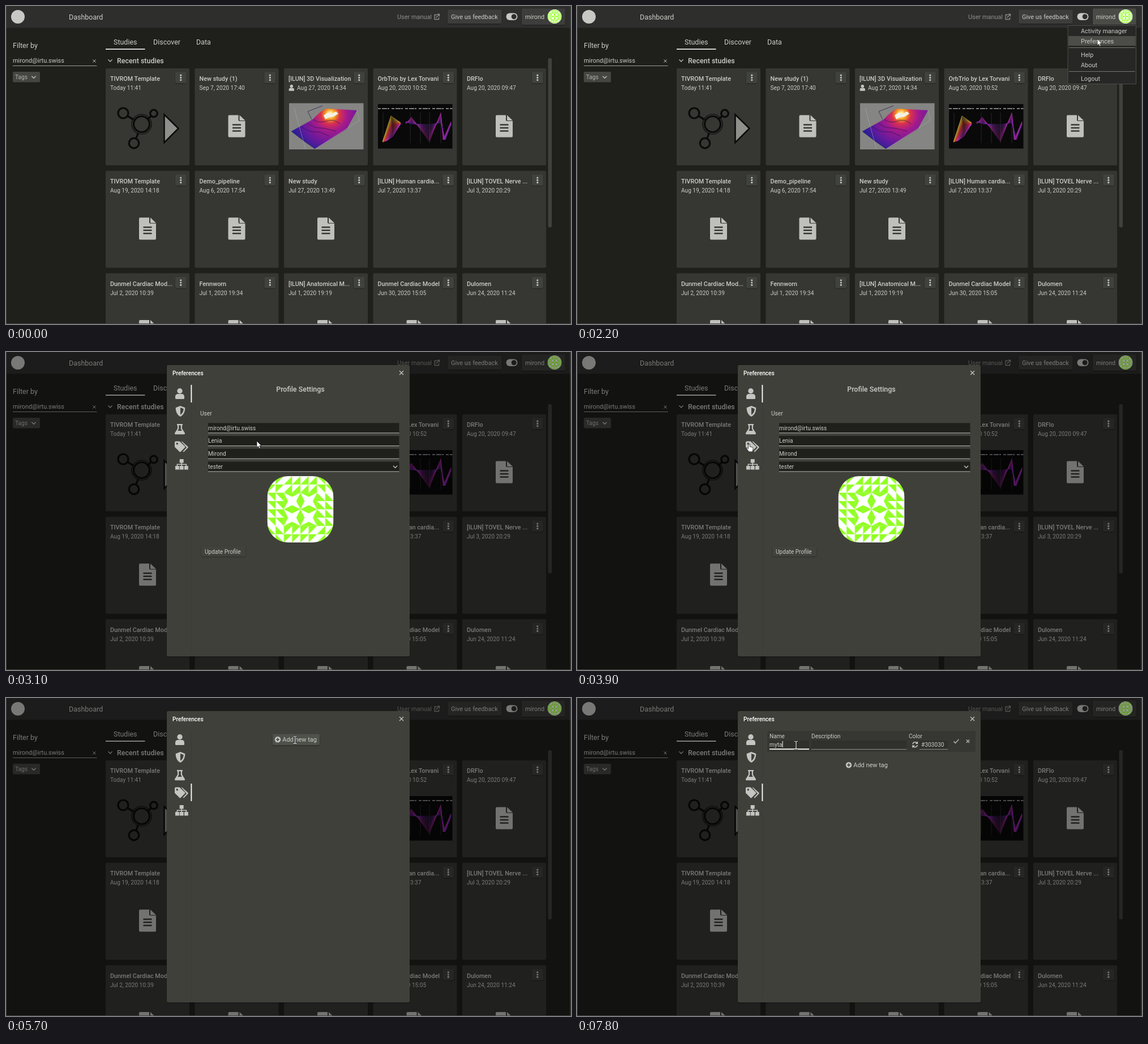
Write an HTML page that moves like this. It is 998 px wide and 561 px high and loops after 8000 ms.

```html
<!DOCTYPE html>
<html lang="en">
<head>
<meta charset="utf-8">
<title>Dashboard preferences</title>
<style>
html, body { margin: 0; width: 100%; height: 100%; overflow: hidden; background: #1f201c; }
svg { display: block; width: 100vw; height: 100vh; }
text { font: 10.92px Roboto, Arial, sans-serif; fill: #cbccc7; white-space: pre; }
.s { font-size: 10.14px; }
.l { font-size: 12.48px; }
.b { font-weight: 500; }
.t { font-size: 10.8px; font-weight: 500; }
.w { fill: #fff; }
.dim { fill: #8f908b; }
.mid { text-anchor: middle; }
.ic { fill: #c4c5c0; }
.ln { fill: none; stroke: #c4c5c0; stroke-width: 1.3; }
.hole { fill: #3f403b; }

.a { opacity: 0; animation: 8s step-end infinite; }
.m { animation: 8s step-end infinite; }
#hover { animation-name: hover; }
#menu { animation-name: menu; }
#item1 { animation-name: item1; }
#item2 { animation-name: item2; }
#modal { animation-name: modal; }
#profile { animation-name: profile; }
#before { animation-name: before; }
#after { animation-name: after; }
#tags { animation-name: tags; }
#bar { animation-name: bar; }
#addbg { animation-name: addbg; }
#add { animation-name: add; }
#form { animation-name: form; }
#focus { animation-name: focus; }
#caret { animation-name: caret; }
#typed1 { animation-name: typed1; }
#typed2 { animation-name: typed2; }
#typed4 { animation-name: typed4; }
#cursor { animation-name: travel; }
#arrow { animation-name: arrow; }
#hand { animation-name: hand; }
#beam { animation-name: beam; }

@keyframes hover { 10% { opacity: 1 } 32.5% { opacity: 0 } }
@keyframes menu { 15% { opacity: 1 } 32.5% { opacity: 0 } }
@keyframes item1 { 25% { opacity: 1 } 27.5% { opacity: 0 } }
@keyframes item2 { 27.5% { opacity: 1 } 32.5% { opacity: 0 } }
@keyframes modal { 32.5% { opacity: 1 } }
@keyframes profile { 32.5% { opacity: 1 } 53.75% { opacity: 0 } }
@keyframes before { 32.5% { opacity: 1 } 36.25% { opacity: 0 } }
@keyframes after { 36.25% { opacity: 1 } }
@keyframes tags { 53.75% { opacity: 1 } }
@keyframes bar { 53.75% { transform: translateY(93px) } }
@keyframes addbg { 70% { opacity: 1 } 73.75% { opacity: 0 } }
@keyframes add { 73.75% { transform: translateY(45px) } }
@keyframes form { 73.75% { opacity: 1 } }
@keyframes focus { 87.5% { opacity: 1 } }
@keyframes caret {
  88.75% { opacity: 1; transform: none }
  93.75% { opacity: 1; transform: translateX(8.9px) }
  95% { opacity: 1; transform: translateX(13.7px) }
  97.5% { opacity: 1; transform: translateX(22.6px) }
}
@keyframes typed1 { 93.75% { opacity: 1 } 95% { opacity: 0 } }
@keyframes typed2 { 95% { opacity: 1 } 97.5% { opacity: 0 } }
@keyframes typed4 { 97.5% { opacity: 1 } }
@keyframes arrow { 10% { opacity: 1 } 48.75% { opacity: 0 } 62.5% { opacity: 1 } 63.75% { opacity: 0 } }
@keyframes hand { 48.75% { opacity: 1 } 62.5% { opacity: 0 } }
@keyframes beam { 63.75% { opacity: 1 } }
@keyframes travel {
  10% { transform: translate(966px, 24px) }
  11.25% { transform: translate(957px, 19px) }
  12.5% { transform: translate(952px, 16px) }
  13.75% { transform: translate(949px, 14px) }
  22.5% { transform: translate(947px, 15px) }
  23.75% { transform: translate(942px, 24px) }
  25% { transform: translate(933px, 38px) }
  26.25% { transform: translate(924px, 50px) }
  27.5% { transform: translate(919px, 58px) }
  36.25% { transform: translate(840px, 84px) }
  37.5% { transform: translate(640px, 125px) }
  38.75% { transform: translate(443px, 157px) }
  41.25% { transform: translate(347px, 157px) }
  43.75% { transform: translate(330px, 161px) }
  45% { transform: translate(300px, 168px) }
  46.25% { transform: translate(269px, 172px) }
  47.5% { transform: translate(288px, 167px) }
  48.75% { transform: translate(304px, 162px) }
  62.5% { transform: translate(318px, 157px) }
  63.75% { transform: translate(368px, 136px) }
  65% { transform: translate(432px, 112px) }
  66.25% { transform: translate(486px, 92px) }
  67.5% { transform: translate(510.5px, 85px) }
  70% { transform: translate(510.5px, 78px) }
  71.25% { transform: translate(510.5px, 74px) }
  73.75% { transform: translate(500px, 75px) }
  75% { transform: translate(480px, 77px) }
  76.25% { transform: translate(450px, 79px) }
  77.5% { transform: translate(420px, 81px) }
  78.75% { transform: translate(398px, 83px) }
  80% { transform: translate(387px, 83px) }
}
</style>
</head>
<body>
<svg viewBox="0 0 998 561">
  <defs>
    <g id="ident"></g>
    <clipPath id="round"><circle cx="2" cy="2" r="2"/></clipPath>
    <clipPath id="soft"><rect width="4" height="4" rx="1.25"/></clipPath>
    <path id="cross" d="M-3.5-3.5l7 7m0-7l-7 7"/>
    <path id="down" d="M-3.6-1.8l3.6 3.6 3.6-3.6"/>
    <g id="person"><circle cy="-4.7" r="4.7"/><path d="M-8 8v-2.500q0-5 5-5h6q5 0 5 5v2.500q0 1.500-1.500 1.500h-13q-1.500 0-1.500-1.500z"/></g>
    <g id="doc">
      <path d="M-13-19.500h16v8.500q0 2 2 2h10v26.500q0 2-2 2h-26q-2 0-2-2v-35q0-2 2-2z" fill="#bfc0bb"/>
      <path d="M5-19.500l10 9.500h-9q-1 0-1-1z" fill="#bfc0bb"/>
      <path d="M-7.500-2.500h15m-15 5.500h15m-15 5.500h15" stroke="#363733" stroke-width="2.500"/>
    </g>
    <radialGradient id="heat" gradientUnits="userSpaceOnUse" cx="573" cy="191" r="70">
      <stop offset=".04" stop-color="#fff3a0"/><stop offset=".13" stop-color="#f59a20"/>
      <stop offset=".24" stop-color="#d8304f"/><stop offset=".42" stop-color="#a31a8c"/>
      <stop offset=".75" stop-color="#651a9d"/><stop offset="1" stop-color="#2b1f97"/>
    </radialGradient>
    <filter id="shadow" x="-10%" y="-20%" width="120%" height="150%"><feDropShadow dx="0" dy="1" stdDeviation="1" flood-opacity=".4"/></filter>
  </defs>

  <rect width="998" height="561" fill="#1f201c"/>

  <!-- header -->
  <rect width="998" height="38.500" fill="#2e2f2d"/>
  <circle cx="21" cy="19" r="12" fill="#c8c9c5"/>
  <text class="l" x="111" y="23.500">Dashboard</text>
  <text class="dim" x="691" y="22.500">User manual</text>
  <path class="ln" style="stroke:#8f908b" d="M761 15.500h-4v8h7.500v-3.500M759.500 20.500l5.500-5.500m-3.500-.5h4v4"/>
  <g filter="url(#shadow)" fill="#3d3e3b">
    <rect x="780" y="6.500" width="95.500" height="24.500" rx="2"/>
    <rect x="911" y="4.500" width="76.500" height="28.500" rx="2"/>
  </g>
  <text x="786" y="22.500">Give us feedback</text>
  <rect x="883.500" y="12.500" width="20" height="12.500" rx="6.250" fill="#c8c9c5"/>
  <circle cx="897.200" cy="18.750" r="4.500" fill="#2e2f2d"/>
  <rect id="hover" class="a" x="911" y="4.500" width="76.500" height="28.500" rx="2" fill="#4a4b47"/>
  <text x="917" y="22.500">mirond</text>
  <g transform="translate(956.500 6) scale(6.250)" clip-path="url(#round)"><use href="#ident"/></g>

  <!-- filters -->
  <text class="l" x="12" y="73.500">Filter by</text>
  <text x="12" y="100">mirond@irtu.swiss</text>
  <path d="M12 105.500h148.500" stroke="#9c9d98"/>
  <use href="#cross" class="ln" transform="translate(156 97) scale(.75)"/>
  <rect x="12" y="116" width="48" height="18.500" rx="2" fill="#454642"/>
  <text class="s" x="16" y="129.300" style="fill:#b1b2ad">Tags</text>
  <use href="#down" class="ln" x="49" y="125.500"/>

  <!-- tabs and list -->
  <text class="l" x="190" y="67.700">Studies</text>
  <text class="l" x="260" y="67.700">Discover</text>
  <text class="l" x="336" y="67.700">Data</text>
  <rect x="176" y="75.300" width="69.500" height="1.700" fill="#eee"/>
  <use href="#down" class="ln" x="184" y="96.200"/>
  <text class="l b" x="196" y="100.500">Recent studies</text>
  <g id="cards"></g>

  <g fill="none" stroke="#0a0a0a" stroke-width="3.200">
    <circle cx="207" cy="189" r="9"/><circle cx="261" cy="189.500" r="6.300"/><circle cx="226" cy="242" r="8.800"/>
    <circle cx="239.500" cy="208.500" r="14"/><circle cx="239.500" cy="208.500" r="17.500" stroke-width="1.200"/>
    <path d="M214.500 194l11 6.500M256.500 194l-5.500 5M229.500 234l4-10"/>
    <path d="M279.500 191.500v49.500l25-25z" fill="#8f908c" stroke-width="2.500"/>
  </g>

  <rect x="500" y="171.500" width="131.500" height="81.500" fill="#858583"/>
  <path d="M504 221L542 200Q556 184 566 181L620 184L602 217L546 252L526 238z" fill="url(#heat)"/>
  <path d="M504 221L526 238L546 252M542 200q12 8 24 3t24 5M533 207q10 8 20 8t30 6M522 213q14 10 24 9t25 8M540 200l-7-14 26-10" fill="none" stroke="#23154f" stroke-width=".7"/>
  <path d="M509 180l20 72M546 252l78-50-4-18" fill="none" stroke="#aeb0b8" stroke-width=".5"/>
  <path d="M561 193l7-5 8 2 7-4 4 4-8 5-7 1-8 4z" fill="#f4f0e6"/>

  <rect x="657" y="173" width="131.500" height="78.500" fill="#090909"/>
  <path d="M657 181h131.500" stroke="#a5a5a5" stroke-width="1.500" stroke-dasharray="5 2 9 1 3 4"/>
  <path d="M666 188v54m48-54v54m18-54v54m16-54v54m20-54v54" stroke="#444" stroke-width=".5"/>
  <g id="plot" fill="none" stroke-width=".7"></g>

  <rect x="957.500" y="92" width="6.500" height="298.500" rx="2.500" fill="#40413d"/>

  <!-- user menu -->
  <g id="menu" class="a">
    <rect x="867" y="34.500" width="120.500" height="103" fill="#272825" stroke="#4d4e4a"/>
    <rect id="item1" class="a" x="868" y="35.500" width="118.500" height="17" fill="#4c4d49"/>
    <rect id="item2" class="a" x="868" y="53" width="118.500" height="17" fill="#4c4d49"/>
    <path d="M869 73.500h116.500M869 115.500h116.500" stroke="#777873"/>
    <text x="890" y="47.500">Activity manager</text>
    <text x="890" y="65.500">Preferences</text>
    <text x="890" y="89.500">Help</text>
    <text x="890" y="107.500">About</text>
    <text x="890" y="131.500">Logout</text>
  </g>

  <g id="modal" class="a">
    <rect x="1" width="995.500" height="560" opacity=".4"/>
    <rect x="284" y="23" width="429" height="514" rx="3" fill="#3f403b" filter="url(#shadow)"/>
    <text class="s b w" x="294" y="40.500">Preferences</text>
    <use href="#cross" class="ln" x="698.500" y="36.700"/>
    <path d="M327.500 58v473" stroke="#393a35"/>
    <rect id="bar" class="m" x="326.500" y="58" width="1.800" height="31" fill="#fff"/>

    <g class="ic">
      <use href="#person" x="307" y="73.500"/>
      <path d="M308 95l8.300 3.300c0 7-2.300 12.500-8.300 15.700c-6-3.200-8.300-8.700-8.300-15.700z"/>
      <path class="hole" d="M308 98v12.800c3.800-2.400 5.500-6 5.700-10.500z"/>
      <path d="M302 127h10v2.200h-1v6l4.800 7.500q1 2-1.500 2.500h-14.600q-2.500-.5-1.500-2.500l4.800-7.500v-6h-1z"/>
      <path class="hole" d="M305.200 129.200h3.600v6.500l2 3.300h-7.600l2-3.300z"/>
      <path d="M300 157.500h6.500l9.500 9q1 1 0 2l-7.500 7.500q-1 1-2 0l-8.500-8.500v-8q0-2 2-2z"/>
      <circle class="hole" cx="302.300" cy="161.700" r="1.700"/>
      <path d="M309.500 157.800h1.500l10.300 9.200q1 1 0 2l-7.300 7.500-1.500-1 6.500-7z"/>
      <path d="M306.700 189h7v6.500h-7zM299 201h6.800v6.500h-6.800zM306.700 201h7v6.500h-7zM315 201h6.800v6.500h-6.800z"/>
      <path class="ln" style="stroke-width:1.600" d="M310.200 195v6M302.400 201v-2.700h16v2.700"/>
    </g>

    <g id="profile" class="a">
      <text class="l b mid" x="520" y="69.500">Profile Settings</text>
      <text class="s" x="343" y="112">User</text>
      <g id="fields"></g>
      <text class="s" x="357" y="205.500">tester</text>
      <use href="#down" class="ln" x="687.500" y="202.500"/>
      <g id="before" class="a">
        <text class="s" x="357" y="137.500">dotty@irtu.orve.ch</text>
        <text class="s" x="357" y="160">Dotty</text>
        <text class="s" x="357" y="182.700">Dorvane</text>
        <circle cx="520" cy="277" r="55" fill="#d0e89b"/>
        <g fill="#0b0b0b">
          <path d="M505 285Q497 300 494 328Q506 335 520 335T546 328Q543 300 535 285z"/>
          <path id="ear" d="M504 247C495 240 484 242 481 254C478 267 480 275 488 280C495 276 499 266 505 261z"/>
          <use href="#ear" transform="translate(1040) scale(-1 1)"/>
          <path d="M503 247Q520 238 537 247Q545 262 540 279Q536 300 530 306Q520 312 510 306Q504 300 500 279Q495 262 503 247z"/>
        </g>
        <g id="half">
          <path d="M485 249q8-4 15 1M484 256q4 10 4 18M508 251q6-3 9-1M512 290q-4 6-1 13M504 313q-4 7-5 15M511 318q-1 7 0 13" fill="none" stroke="#6c6c6c" stroke-width="1.200"/>
          <ellipse cx="506" cy="271" rx="4.600" ry="4" fill="#a8354a"/>
          <circle cx="506.500" cy="271" r="2"/>
        </g>
        <use href="#half" transform="translate(1040) scale(-1 1)"/>
        <path d="M513 303q7 6 14 0" fill="none" stroke="#ddd" stroke-width="1.500"/>
        <ellipse cx="520" cy="297" rx="6" ry="5" stroke="#888"/>
        <path d="M516 294q4-2 8 0" fill="none" stroke="#bbb"/>
      </g>
      <g id="after" class="a">
        <text class="s" x="357" y="137.500">mirond@irtu.swiss</text>
        <text class="s" x="357" y="160">Lenia</text>
        <text class="s" x="357" y="182.700">Mirond</text>
        <g transform="translate(461.500 219) scale(29.250)" clip-path="url(#soft)"><use href="#ident"/></g>
      </g>
      <rect x="345" y="343" width="78" height="17.500" rx="2" fill="#42433e" filter="url(#shadow)"/>
      <text class="s" x="351" y="355.500">Update Profile</text>
    </g>

    <g id="tags" class="a">
      <rect id="addbg" class="a" x="471" y="63.500" width="83" height="19.500" rx="2" fill="#50514c" filter="url(#shadow)"/>
      <g id="add" class="m">
        <circle class="ic" cx="480" cy="73.200" r="5.200"/>
        <path d="M477 73.200h6m-3-3v6" stroke="#3f403b" stroke-width="1.600"/>
        <text x="488.300" y="77">Add new tag</text>
      </g>
      <g id="form" class="a">
        <rect x="336" y="58" width="368" height="37" rx="2" fill="#363732"/>
        <path d="M340 75h70v15.500h-70zM414 75h168v15.500h-168zM605 75h50v15.500h-50z" fill="#30312d"/>
        <path d="M340 90.500h70m4 0h168m23 0h50" stroke="#8d8e89"/>
        <rect id="focus" class="a" x="340" y="89.300" width="70" height="1.800" fill="#fff"/>
        <text class="s" x="340" y="71.300">Name</text>
        <text class="s" x="414" y="71.300">Description</text>
        <text class="s" x="586" y="71.300">Color</text>
        <text class="s" x="608" y="85.500">#303030</text>
        <path class="ln" style="stroke-width:1.600" d="M593 81.500a4.200 4.200 0 0 1 7.500-2M601.200 83a4.200 4.200 0 0 1-7.500 2M601.300 77v3.300h-3.300M593 87.500v-3.300h3.300"/>
        <path class="ln" style="stroke-width:1.800;stroke:#a5a6a1" d="M665.500 76.500l3 3 5.800-6.500"/>
        <use href="#cross" class="ln" style="stroke-width:2.200;stroke:#a5a6a1" transform="translate(690.500 76.300) scale(.75)"/>
        <text id="typed1" class="s a" x="340" y="85.500">m</text>
        <text id="typed2" class="s a" x="340" y="85.500">my</text>
        <text id="typed4" class="s a" x="340" y="85.500">myta</text>
        <rect id="caret" class="a" x="340" y="76" width="1" height="11" fill="#fff"/>
      </g>
    </g>
  </g>

  <path d="M.5 0v561M997 0v561M0 560.500h998" stroke="#454642"/>

  <g id="cursor" class="m">
    <path id="arrow" class="a" d="M0 0v11.500l2.600-2.300 1.900 4 1.900-.9-1.800-3.900h3.500z" fill="#fff" stroke="#111" stroke-width=".7"/>
    <path id="hand" class="a" d="M-1.300 1q1.300-1.800 2.600 0v4l4.500 1q1.500.500 1.300 2.500l-1 5.500h-6.500l-4-5.500q0-1.600 1.800-1l1.300 1z" fill="#fff" stroke="#111" stroke-width=".8"/>
    <g id="beam" class="a" fill="none">
      <path d="M-3-6.500q3 0 3 1.500v10q0 1.500-3 1.500M3-6.500q-3 0-3 1.500v10q0 1.500 3 1.500" stroke="#111" stroke-width="2.400"/>
      <path d="M-3-6.500q3 0 3 1.500v10q0 1.500-3 1.500M3-6.500q-3 0-3 1.500v10q0 1.500 3 1.500" stroke="#fff" stroke-width="1.100"/>
    </g>
  </g>
</svg>
<script>
const fill = (id, html) => { document.getElementById(id).innerHTML = html; };
const times = (n, fn) => Array.from({ length: n }, (_, i) => fn(i)).join('');

// title, date, content: d = document icon, u = shared study
const studies = [
  ['TIVROM Template', 'Today 11:41', ''],
  ['New study (1)', 'Sep 7, 2020 17:40', 'd'],
  ['[ILUN] 3D Visualization', 'Aug 27, 2020 14:34', 'u'],
  ['OrbTrio by Lex Torvani', 'Aug 20, 2020 10:52', ''],
  ['DRFlo', 'Aug 20, 2020 09:47', 'd'],
  ['TIVROM Template', 'Aug 19, 2020 14:18', 'd'],
  ['Demo_pipeline', 'Aug 6, 2020 17:54', 'd'],
  ['New study', 'Jul 27, 2020 13:49', 'd'],
  ['[ILUN] Human cardia...', 'Jul 7, 2020 13:37', ''],
  ['[ILUN] TOVEL Nerve ...', 'Jul 3, 2020 20:29', ''],
  ['Dunmel Cardiac Mod...', 'Jul 2, 2020 10:39', 'd'],
  ['Fennworn', 'Jul 1, 2020 19:34', 'd'],
  ['[ILUN] Anatomical M...', 'Jul 1, 2020 19:19', 'd'],
  ['Dunmel Cardiac Model', 'Jun 30, 2020 15:05', 'd'],
  ['Dulomen', 'Jun 24, 2020 11:24', 'd']
];

fill('cards', studies.map(([title, date, kind], i) => {
  const x = 176 + 157.5 * (i % 5), y = 110 + 180.8 * Math.floor(i / 5);
  const shared = kind === 'u';
  return `<g transform="translate(${x} ${y})">
    <rect width="148" height="171" rx="2" fill="#363733"/>
    <text class="t" x="8" y="22">${title}</text>
    <text class="s" x="${shared ? 23 : 8}" y="38.300">${date}</text>
    <rect x="123" y="6.500" width="19.500" height="19.500" rx="2" fill="#41423e" filter="url(#shadow)"/>
    ${times(3, k => `<circle class="ic" cx="132.800" cy="${12.2 + 4.2 * k}" r="1.600"/>`)}
    ${kind === 'd' ? '<use href="#doc" x="74" y="102"/>' : ''}
    ${shared ? '<use href="#person" class="ic" transform="translate(13.300 34.300) scale(.58)"/>' : ''}
  </g>`;
}).join(''));

fill('plot', times(16, i => {
  const k = i / 15;
  return `<path stroke="hsl(${52 - 120 * k} 75% 55%)" d="M${665 + 7 * k} ${240 - 2 * k}L${680 + 3 * k} ${194 + 36 * k}L697 ${206 + 2 * k}"/>
    <path stroke="hsl(${310 - 35 * k} 60% 42%)" opacity=".6" d="M706 ${208 - 4 * k}L716 ${196 + 12 * k}L748 ${239 - 30 * k}L768 ${188 + 18 * k}L${772 + 4 * k} 236L786 ${204 + 5 * k}"/>`;
}));

fill('fields', times(4, i => {
  const y = 125.3 + 22.7 * i;
  return `<rect x="357" y="${y}" width="337.500" height="17.500" fill="#1f201c"/>
    <rect x="357" y="${y + 17}" width="337.500" height="1" fill="#b5b6b1"/>`;
}));

// four-by-four geometric avatar
const quad = (x, y, shape) => times(4, k => `M${x + k % 2 / 2} ${y + (k >> 1) / 2}${shape}`);
const side = quad(0, 0, 'h.5l-.5 .5z') + quad(1, 0, 'm0 .5h.5v-.5z') + quad(2, 0, 'm0 .5h.5v-.5z');
const star = 'l.5 .25 .5-.25-.25 .5 .25 .5-.5-.25-.5 .25 .25-.5z';
fill('ident', `<rect width="4" height="4" fill="#fff"/>
  <g fill="#92ff24"><rect x="1" y="1" width="2" height="2"/>
  ${times(4, k => `<path d="${side}" transform="rotate(${90 * k} 2 2)"/>`)}</g>
  <path fill="#fff" d="${times(4, k => `M${1 + k % 2} ${1 + (k >> 1)}${star}`)}"/>`);
</script>
</body>
</html>
```
